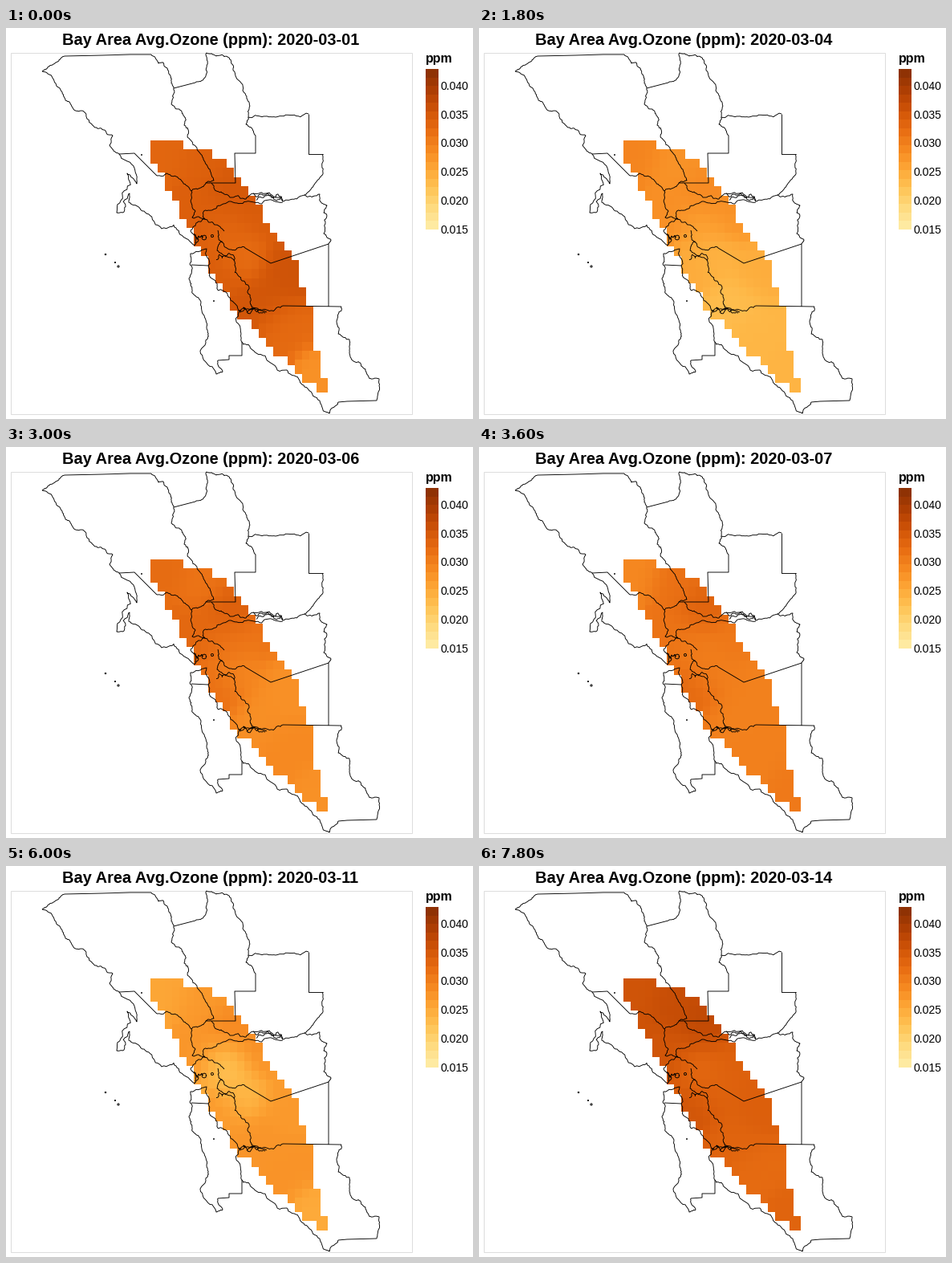
A matplotlib script that plays this animation: 582x487 px, repeating every 8 s.

```python
import numpy as np
import matplotlib.pyplot as plt
from matplotlib.animation import FuncAnimation
from matplotlib.collections import LineCollection, PolyCollection
from matplotlib.colors import LinearSegmentedColormap
from matplotlib.patches import Rectangle

W, H, DPI = 582, 487, 64
PX = 72 / DPI  # points per pixel
FRAMES, INTERVAL, HOLD = 40, 200, 3
LOW, HIGH = 15, 43  # colour domain, ppb
ROWS, CELL_W, CELL_H = 27, 14, 17.6

ramp = LinearSegmentedColormap.from_list("ozone", [
    "#feeaa1", "#fedd84", "#fecc63", "#feb746", "#fca031", "#f68921",
    "#eb7215", "#db5e0b", "#c54c05", "#ab3d03", "#8f3204"], N=512)
rng = np.random.default_rng(7)

# Stations and their readings on the days listed
STATIONS = np.array([
    (195, 155), (245, 168), (282, 200), (238, 232), (314, 235), (275, 250),
    (292, 280), (262, 305), (350, 300), (315, 345), (345, 380), (390, 435)])
DAYS = [1, 3, 5, 7, 9, 11, 14]
READINGS = np.array([
    [33.4, 34.2, 35.5, 34.5, 35, 33.8, 32.3, 35, 36.2, 35.8, 33, 28],
    [23, 24.4, 22.8, 21.8, 23.8, 19.5, 19.3, 18.5, 23, 18.8, 19, 22.5],
    [36.2, 31.2, 35, 34.8, 32, 33, 28.2, 31.3, 26.2, 26.6, 28, 25.2],
    [29.2, 32, 34, 31.7, 31, 30.6, 30.3, 33, 30, 30, 30.1, 30.9],
    [26.2, 28.6, 25.3, 26.2, 24.2, 23, 28, 26.4, 25.3, 23, 21, 26.4],
    [25.5, 27, 29, 27.5, 28.4, 21.5, 23.3, 27.2, 27, 27.5, 27.8, 25],
    [36.1, 37.2, 38, 36, 34.3, 33, 34, 36, 34.5, 33.8, 32.8, 33.8],
])

lines = []


def border(*points):
    lines.append(np.array(points, float))


def shore(*points, amp=.11, levels=4):
    """Fractal line through the points by midpoint displacement."""
    line = np.array(points, float)
    for _ in range(levels):
        step = np.diff(line, axis=0)
        normal = np.column_stack([-step[:, 1], step[:, 0]])
        push = np.clip(rng.normal(0, amp, (len(step), 1)), -.3, .3)
        fine = np.empty((2 * len(line) - 1, 2))
        fine[::2] = line
        fine[1::2] = line[:-1] + step / 2 + normal * push
        line = fine
    lines.append(line)


def slough(x, y, w, h):
    """Tangled inlet running across a box."""
    t = np.linspace(0, 1, 7)
    shore(*np.column_stack([x + w * t, y + h * rng.random(7)]), amp=.2, levels=2)


def islet(x, y, r):
    a = np.linspace(0, 2 * np.pi, 9)
    shore(*np.column_stack([x + r * np.cos(a), y + r * np.sin(a)]), levels=1)


# Surveyed county borders
border((73, 35), (120, 34), (155, 33), (181, 33))
border((209, 75), (236, 68))
border((311, 134), (311, 156), (285, 156), (286, 193), (249, 193))
border((377, 107), (377, 157), (395, 157))
border((402, 347), (402, 269), (330, 293), (298, 274))
border((418, 347), (345, 346))
border((231, 295), (252, 296))
border((264, 414), (278, 413), (278, 408), (294, 408), (294, 391))
border((414, 466), (425, 465), (462, 464))
border((141, 157), (160, 156), (188, 184))

# Northern counties
shore((45, 54), (58, 46), (73, 35))
shore((45, 54), (62, 69), (74, 90), (84, 101), (100, 108), (111, 124),
      (133, 134), (129, 146), (141, 157))
shore((181, 33), (190, 44), (196, 43), (203, 57), (209, 75))
shore((209, 75), (206, 95), (219, 104), (222, 121), (226, 135), (241, 155),
      (251, 172), (259, 190), (249, 193), (231, 203))
shore((188, 184), (212, 185), (231, 203))
shore((236, 68), (250, 49), (250, 31), (262, 35), (278, 37), (283, 50),
      (299, 84), (302, 111), (299, 120), (311, 134))
shore((302, 111), (336, 111), (377, 107))
shore((395, 157), (393, 184), (379, 202), (372, 208), (345, 216))

# Ocean side
shore((141, 157), (163, 194), (151, 181), (138, 230), (147, 229), (154, 206),
      (153, 217), (170, 228), (190, 246), (221, 260), (235, 271), (236, 260))
shore((229, 294), (230, 281), (250, 275), (252, 296))
shore((229, 294), (228, 312), (232, 330), (243, 341), (250, 372), (248, 395),
      (262, 431), (270, 428), (264, 414))

# Bay side
shore((231, 203), (236, 228), (232, 236), (248, 238), (230, 253), (240, 264),
      (236, 268))
shore((252, 296), (256, 312), (265, 327), (281, 340), (290, 352), (303, 350))
shore((293, 352), (287, 366), (294, 391))
shore((272, 253), (247, 237), (246, 229), (256, 227), (271, 219), (309, 217),
      (345, 217))
shore((256, 193), (268, 204), (279, 211), (299, 213), (308, 206), (345, 216))
shore((298, 274), (273, 273), (264, 252))
shore((270, 266), (263, 277), (285, 291), (289, 308), (305, 337), (308, 350))
shore((303, 350), (320, 351), (345, 346))

# East and south
shore((372, 208), (391, 207), (400, 221), (396, 230), (396, 256), (405, 264),
      (402, 269))
shore((294, 391), (312, 405), (350, 426), (372, 447), (398, 478), (403, 480),
      (414, 466))
shore((462, 464), (465, 437), (451, 433), (448, 425), (432, 414), (428, 388),
      (414, 381), (412, 366), (418, 347))

slough(308, 206, 37, 11)
slough(312, 208, 30, 7)
slough(262, 278, 22, 12)
slough(291, 348, 32, 8)
slough(300, 347, 25, 8)
slough(234, 252, 12, 15)
for spot in [(124, 282, .8), (136, 292, .6), (140, 297, 1.2), (169, 158, .5),
             (259, 340, .5), (247, 261, 3), (257, 259, 1.6)]:
    islet(*spot)


def row_span(r):
    """First and last filled column of a grid row."""
    first = max(2 * r // 3 + (r == 16), int(np.floor(1.27 * (r - 26) + 23)))
    last = np.interp(r, [0, 1, 2, 7, 8, 13, 15, 18, 22, 23, 25, 26],
                     [3, 7, 9, 14, 14, 19, 19, 21, 21, 22, 22, 23])
    return first, int(round(last))


def cell_corner(row, col):
    return 179.5 + 9.02 * col, 139.5 + 11.56 * row - .006 * row ** 2


corners = []
for row in range(ROWS):
    first, last = row_span(row)
    corners += [cell_corner(row, col) for col in range(first, last + 1)]
corners = np.array(corners)
box = np.array([(0, 0), (CELL_W, 0), (CELL_W, CELL_H), (0, CELL_H)])

centres = corners + (4.5, 6)
dist2 = ((centres[:, None] - STATIONS[None]) ** 2).sum(axis=2)
weights = np.exp(-dist2 / (2 * 19 ** 2))
weights /= weights.sum(axis=1, keepdims=True)


def cell_colors(day):
    stations = [np.interp(day, DAYS, series) for series in READINGS.T]
    return ramp((weights @ np.array(stations) - LOW) / (HIGH - LOW))


fig = plt.figure(figsize=(W / DPI, H / DPI), dpi=DPI, facecolor="white")
ax = fig.add_axes([0, 0, 1, 1])
ax.axis("off")


def label(x, y, text, size, **style):
    return ax.text(x, y, text, fontsize=size * PX, family="Liberation Sans",
                   va="baseline", color="black", **style)


# Map
ax.add_patch(Rectangle((5.5, 30.5), 500, 450, fill=False, ec="#dddddd", lw=PX))
cells = PolyCollection(corners[:, None] + box[None], linewidths=0,
                       edgecolors="none", antialiaseds=False, zorder=2)
ax.add_collection(cells)
ax.add_collection(LineCollection(lines, colors="black", linewidths=.9 * PX,
                                 zorder=3))

# Legend
bands = np.linspace(1, 0, 19)[:, None]
ax.imshow(ramp(bands), extent=(523, 539, 251, 51), aspect="auto",
          interpolation="nearest")
label(523, 43, "ppm", 16, weight="bold")
for ppb in range(15, 41, 5):
    y = 251 - (ppb - LOW) / (HIGH - LOW) * 200
    label(541, round(y + 4.6), f"{ppb / 1000:.3f}", 14)

title = label(255, 21, "", 20, weight="bold", ha="center")
ax.set_xlim(0, W)
ax.set_ylim(H, 0)


def update(i):
    day = 1 + i // HOLD
    cells.set_facecolor(cell_colors(day))
    title.set_text(f"Bay Area Avg.Ozone (ppm): 2020-03-{day:02d}")
    return cells, title


anim = FuncAnimation(fig, update, frames=FRAMES, interval=INTERVAL,
                     repeat=True, repeat_delay=0, blit=False)
plt.show()
```
